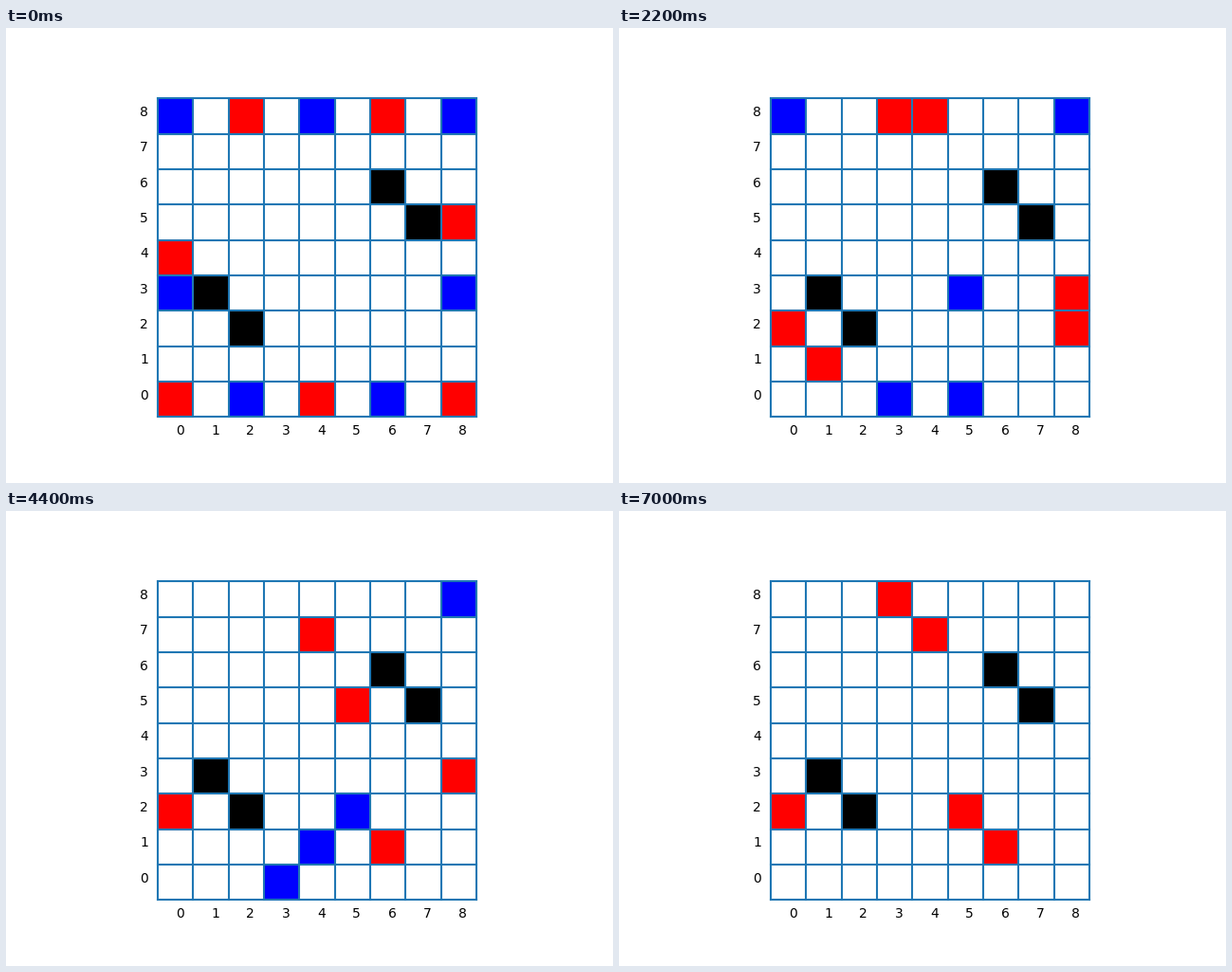
These frames come from a looping animation (640 px wide and 480 px high, 7100 ms). A matplotlib script:

```python
import matplotlib.pyplot as plt
from matplotlib.animation import FuncAnimation
from matplotlib.patches import Rectangle

SIZE = 9
STEPS = {"l": (-1, 0), "r": (1, 0), "u": (0, 1), "d": (0, -1)}
WALLS = [(6, 6), (7, 5), (1, 3), (2, 2)]
BLUE = [(0, 8), (4, 8), (8, 8), (0, 3), (8, 3), (2, 0), (6, 0)]
RED = [(2, 8), (6, 8), (8, 5), (0, 4), (0, 0), (4, 0), (8, 0)]

# Column, row, direction; blue and red take turns, blue first.
MOVES = """
20r 85d 60l 80u 83l 84d 03d 04d 02r 03d 73d 81u
72l 00u 48d 01r 62l 28r 47u 68l 52u 58l
08d 11r 07d 48d 06r 21r 16r
82l 26r 72d 36r 71l 53l 38r 43d 48r 42d 58d 50u 57d 51u 56d
41u 83l 52r 73d 42d 72l 88l 55d 78l 54d 41u 53l 68l 62l 58d
43u 57u 44u 58l 45u 30u 47l 31u 37u 32u 46u
""".split()


def neighbours(cell):
    return {(cell[0] + dx, cell[1] + dy) for dx, dy in STEPS.values()}


def play():
    """Return the (blue, red) cells after every turn."""
    sides = [set(BLUE), set(RED)]
    history = [(set(BLUE), set(RED))]
    for turn, (col, row, way) in enumerate(MOVES):
        mine, other = sides[turn % 2], sides[1 - turn % 2]
        dx, dy = STEPS[way]
        x, y = int(col), int(row)
        mine.remove((x, y))
        mine.add((x + dx, y + dy))
        # Two adjacent enemies capture a piece; a lone survivor is lost too.
        other -= {c for c in other if len(neighbours(c) & mine) >= 2}
        if len(other) == 1:
            other.clear()
        history.append((set(sides[0]), set(sides[1])))
    return history


history = play()

fig = plt.figure(figsize=(6.4, 4.8), dpi=100, facecolor="white")
ax = fig.add_axes([0.125, 0.11, 0.775, 0.77])
ax.axis("off")

cells = {}
for x in range(SIZE):
    for y in range(SIZE):
        cells[x, y] = ax.add_patch(Rectangle((x, y), 1, 1, linewidth=0))

for k in range(SIZE + 1):
    ax.plot([k, k], [0, SIZE], color="#1f77b4", lw=1.5)
    ax.plot([0, SIZE], [k, k], color="#1f77b4", lw=1.5)

for k in range(SIZE):
    for x, y in ((k + 0.5, -0.5), (-0.5, k + 0.5)):
        ax.text(x, y, str(k), fontsize=10, family="DejaVu Sans")

# Square cells with a 5 % margin above and below the board.
half = SIZE * 0.55
wide = half * (0.775 * 640) / (0.77 * 480)
ax.set_xlim(SIZE / 2 - wide, SIZE / 2 + wide)
ax.set_ylim(SIZE / 2 - half, SIZE / 2 + half)


def draw(i):
    blue, red = history[i]
    for cell, patch in cells.items():
        if cell in WALLS:
            color = "black"
        elif cell in blue:
            color = "blue"
        elif cell in red:
            color = "red"
        else:
            color = "white"
        patch.set_facecolor(color)
    return list(cells.values())


anim = FuncAnimation(fig, draw, frames=len(history), interval=100,
                     repeat=True, repeat_delay=0)
plt.show()
```
